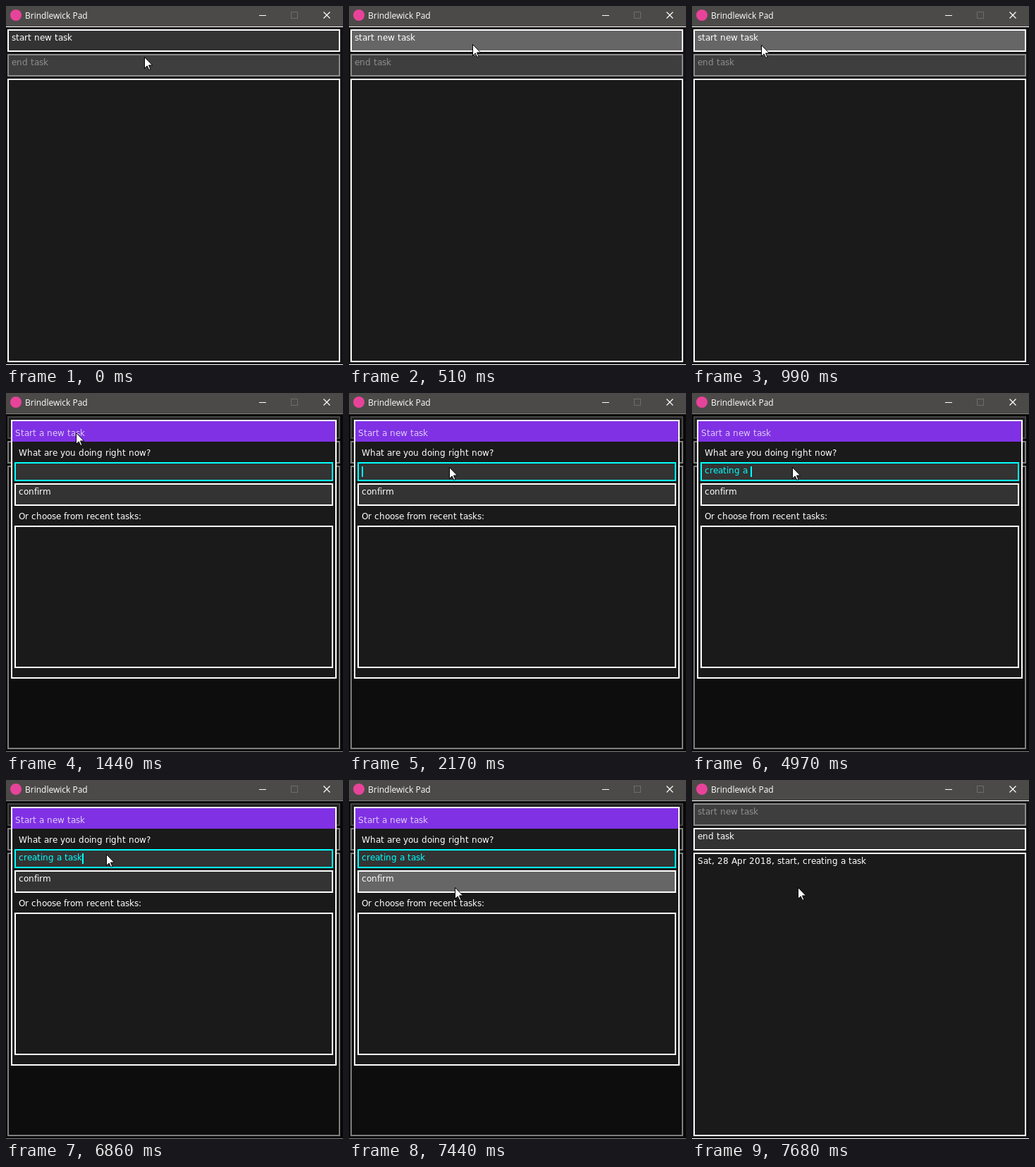
Recreate the animation shown at these times as an HTML page. Size 478x509 px, loop 8000 ms.

```html
<!DOCTYPE html>
<html lang="en">
<head>
<meta charset="utf-8">
<title>Task log</title>
<style>
  html, body { margin: 0; width: 100%; height: 100%; overflow: hidden; background: #141214; }
  svg { display: block; width: 478px; height: 509px; }
  text { font: 12px "DejaVu Sans", sans-serif; white-space: pre; }
  .title { font: 12px "Open Sans", sans-serif; }
  rect { shape-rendering: crispEdges; }
</style>
</head>
<body>
<svg id="stage" viewBox="0 0 478 509" xmlns="http://www.w3.org/2000/svg"></svg>
<script>
const LOOP = 8000, OPEN = 1440, CLOSE = 7680, PRESS = 7520;
const WHITE = '#ffffff', CYAN = '#00ffff', PANEL = '#1a1a1a';
const IDLE = '#333333', HOVER = '#666666';
const OFF = { line: '#8c8c8c', fill: '#3e3e3e', ink: '#8f8f8f' };

// [time, x, y] of the pointer tip
const PATH = [
  [0, 196, 72], [60, 195, 69], [250, 177, 54],
  [510, 175, 54], [680, 140, 52], [860, 106, 53], [990, 98, 55],
  [1750, 99, 57], [1900, 112, 76], [2050, 134, 98], [2170, 142, 105],
  [6860, 142, 105], [6980, 145, 128], [7090, 149, 158], [7170, 150, 169],
  [7270, 150, 164], [7380, 150, 152]
];
const PHRASE = 'creating a task';
const KEYS = [2840, 3070, 3150, 3230, 3390, 3550, 3610, 3770, 3850, 4760, 4970, 5770, 5930, 6010, 6090];
const BLINKS = [1900, 2400, 2870, 3390, 3930, 4390, 4910, 5360, 5860, 6370, 6860, 7360];

const stage = document.getElementById('stage');
const pen = document.createElement('canvas').getContext('2d');
pen.font = '12px "DejaVu Sans", sans-serif';

function set(node, attrs) {
  for (const key in attrs) node.setAttribute(key, attrs[key]);
  return node;
}
function add(parent, tag, attrs) {
  const node = document.createElementNS('http://www.w3.org/2000/svg', tag);
  parent.appendChild(node);
  return set(node, attrs);
}
const rect = (parent, x, y, width, height, fill) => add(parent, 'rect', { x, y, width, height, fill });

// Box given by its outer edges, with a 2px border
function box(parent, x1, y1, x2, y2, fill = PANEL, stroke = WHITE) {
  return add(parent, 'rect', {
    x: x1 + 1, y: y1 + 1, width: x2 - x1 - 2, height: y2 - y1 - 2,
    fill, stroke, 'stroke-width': 2
  });
}

// Whole-pixel advances, as in a bitmap text renderer
const advance = ch => Math.round(pen.measureText(ch).width);
const widthOf = str => [...str].reduce((sum, ch) => sum + advance(ch), 0);
function write(node, str, x) {
  if (node.textContent === str) return;
  let at = x;
  const xs = [...str].map(ch => {
    const left = at;
    at += advance(ch);
    return left;
  });
  node.setAttribute('x', xs.join(' '));
  node.textContent = str;
}
function label(parent, str, x, y, fill = WHITE) {
  const node = add(parent, 'text', { y, fill });
  write(node, str, x);
  return node;
}
function button(parent, str, x1, y1, x2, y2) {
  return { frame: box(parent, x1, y1, x2, y2, IDLE), text: label(parent, str, x1 + 6, y1 + 16) };
}
function paint(btn, enabled, hover) {
  set(btn.frame, {
    fill: !enabled ? OFF.fill : hover ? HOVER : IDLE,
    stroke: enabled ? WHITE : OFF.line
  });
  set(btn.text, { fill: enabled ? WHITE : OFF.ink });
}
const show = (node, on) => set(node, { visibility: on ? 'visible' : 'hidden' });

// Main window
rect(stage, 0, 0, 478, 509, '#141214');
rect(stage, 0, 29, 478, 1, WHITE);
rect(stage, 0, 508, 478, 1, WHITE);
const start = button(stage, 'start new task', 2, 33, 474, 65);
const end = button(stage, 'end task', 2, 68, 474, 100);
box(stage, 2, 103, 474, 505);
const entry = label(stage, 'Sat, 28 Apr 2018, start, ' + PHRASE, 8, 119);

// Title bar
rect(stage, 0, 0, 478, 29, '#4c4a48');
add(stage, 'circle', { cx: 14, cy: 13, r: 8, fill: '#e8439a' });
add(stage, 'text', { x: 27, y: 18, fill: WHITE, class: 'title' }).textContent = 'Brindlewick Pad';
rect(stage, 359, 13, 10, 1, WHITE);
add(stage, 'rect', { x: 404.5, y: 8.5, width: 9, height: 9, fill: 'none', stroke: '#6e6c6a' });
add(stage, 'path', { d: 'M450.5 8.5l9 9m0-9l-9 9', stroke: WHITE, 'stroke-width': 1.2 });

// Dialog
const dialog = add(stage, 'g', {});
rect(dialog, 0, 29, 478, 480, '#000').setAttribute('opacity', 0.5);
box(dialog, 7, 38, 469, 405);
rect(dialog, 9, 40, 458, 29, '#8031e4');
label(dialog, 'Start a new task', 13, 61, '#dccaf7');
label(dialog, 'What are you doing right now?', 18, 89);
const field = box(dialog, 12, 98, 464, 125, IDLE, CYAN);
const typed = label(dialog, '', 18, 114, CYAN);
const caret = rect(dialog, 18, 104, 2, 15, CYAN);
const confirm = button(dialog, 'confirm', 12, 128, 464, 160);
label(dialog, 'Or choose from recent tasks:', 18, 179);
box(dialog, 12, 188, 464, 390);

const pointer = add(stage, 'path', {
  d: 'M.5 .5V16.5L4.2 12.9L6.8 18.5L8.9 17.6L6.5 12H11.6Z',
  fill: WHITE, stroke: '#000'
});

function tipAt(t) {
  const i = PATH.findIndex(p => p[0] > t);
  if (i < 0) return PATH[PATH.length - 1].slice(1);
  const [t0, x0, y0] = PATH[i - 1], [t1, x1, y1] = PATH[i];
  const k = (t - t0) / (t1 - t0);
  return [Math.round(x0 + (x1 - x0) * k), Math.round(y0 + (y1 - y0) * k)];
}
const passed = (times, t) => times.filter(at => at <= t).length;

function draw(t) {
  const [x, y] = tipAt(t);
  const open = t >= OPEN && t < CLOSE;
  const running = t >= OPEN;
  const focused = t < PRESS;
  const ink = focused ? CYAN : WHITE;
  const str = PHRASE.slice(0, passed(KEYS, t));

  paint(start, !running, y >= 33 && y < 65);
  paint(end, running, false);
  show(entry, t >= CLOSE);
  show(dialog, open);
  set(field, { stroke: ink });
  set(typed, { fill: ink });
  write(typed, str, 18);
  set(caret, { x: 18 + widthOf(str) });
  show(caret, open && focused && passed(BLINKS, t) % 2 === 1);
  paint(confirm, true, y >= 128 && y < 160);
  set(pointer, { transform: `translate(${x} ${y})` });
}

const began = performance.now();
function tick() {
  draw((performance.now() - began) % LOOP);
  requestAnimationFrame(tick);
}
tick();
</script>
</body>
</html>
```
